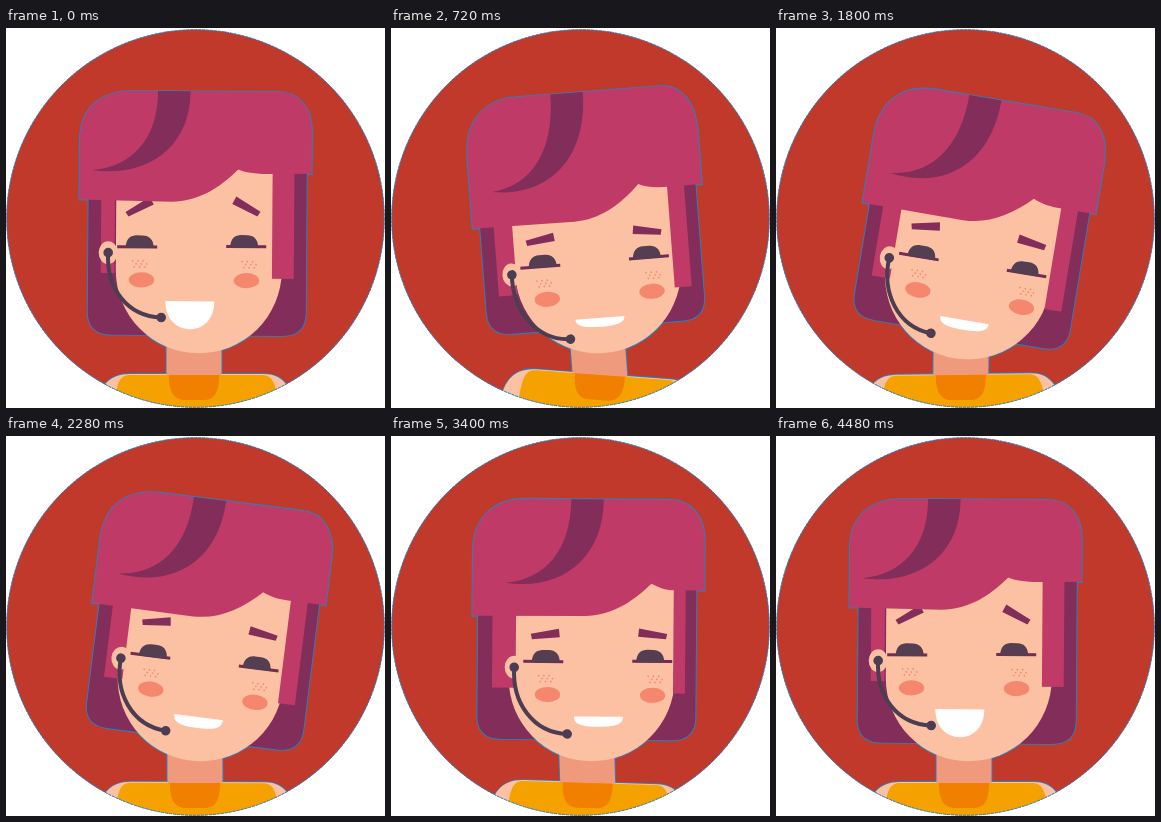
These frames come from a looping animation (379x380 px, 4.6 s). An HTML page:

```html
<!DOCTYPE html>
<html lang="en">
<head>
<meta charset="utf-8">
<title>Headset agent</title>
<style>
  html, body { margin: 0; width: 100%; height: 100%; overflow: hidden; background: #fff; }
  svg { display: block; width: 100%; height: 100%; }
</style>
</head>
<body>
<svg viewBox="0 0 379 380">
  <defs>
    <clipPath id="disc"><circle cx="189.5" cy="190.5" r="189"/></clipPath>
    <path id="back"/>
    <path id="hair"/>
    <path id="face" d="M-83-110V0A83 83 0 0 0 83 0V-110Z"/>
    <path id="neck" d="M-27.5-60H27.5V2H-27.5Z"/>
    <path id="shoulders" d="M-98 40C-97 14-87-1-64-1H70C90-1 99 14 103 40Z"/>
    <path id="lid" d="M-14-32C-14-41-9-44.500-3-44.500H3C9-44.500 14-41 14-32Z"/>
    <path id="brow" d="M-14.500-2.500L14-4.500V4L-14 3Z"/>
  </defs>
  <circle cx="189.5" cy="190.5" r="189" fill="#c1392b"/>
  <g clip-path="url(#disc)">
    <g fill="none" stroke="#1f86c8" stroke-width="1.8">
      <g class="head"><use href="#back"/><use href="#hair"/><use href="#face"/></g>
      <g class="torso"><use href="#neck"/><use href="#shoulders"/></g>
    </g>
    <g class="head"><use href="#back" fill="#822d5a"/></g>
    <g class="torso">
      <use href="#shoulders" fill="#fbc1a2"/>
      <use href="#neck" fill="#f09a7d"/>
      <path d="M-80 40C-78 10-76 0-64 0H68C80 0 82 10 86 40Z" fill="#f5a200"/>
      <path d="M-25 0H25C25 10 24 25 10 25H-9C-24 25-25 10-25 0Z" fill="#f17f00"/>
    </g>
    <g class="head">
      <use href="#face" fill="#fbc1a2"/>
      <path id="locks" fill="#bf3a66"/>
      <ellipse cx="-86" cy="-27" rx="9.5" ry="11.5" fill="#fbc1a2"/>
      <g fill="#f5876e">
        <ellipse cx="-52.5" rx="12.7" ry="7.6"/>
        <ellipse cx="52.5" rx="12.7" ry="7.6"/>
        <g id="freckles"/>
      </g>
      <path d="M-77-34.5H-37V-31.5H-77ZM32-35.5H72V-32.5H32Z" fill="#742b55"/>
      <use href="#lid" x="-54.5" fill="#553d52"/>
      <use href="#lid" x="50" y="-1" fill="#553d52"/>
      <use href="#brow" id="browL" fill="#822d5a"/>
      <use href="#brow" id="browR" fill="#822d5a"/>
      <path id="mouth" fill="#fff"/>
      <path id="cable" fill="none" stroke="#4d3d52" stroke-width="4"/>
      <circle cx="-86" cy="-27" r="4.8" fill="#4d3d52"/>
      <circle id="mic" r="4.8" fill="#4d3d52"/>
      <use href="#hair" fill="#bf3a66"/>
      <path id="stripe" fill="#822d5a"/>
    </g>
  </g>
  <circle cx="189.5" cy="190.5" r="188.8" fill="none" stroke="#1f86c8" stroke-dasharray="3 1"/>
</svg>
<script>
const el = id => document.getElementById(id);
const set = (id, attrs) => {
  for (const name in attrs) el(id).setAttribute(name, attrs[name]);
};
const place = (className, transform) =>
  document.querySelectorAll('.' + className).forEach(g => g.setAttribute('transform', transform));

const LOOP = 4600, STEP = 40;

// lean: sway of the body, tilt: degrees, nod and turn: parallax in pixels.
const rest = { lean: 0, drop: 0, tilt: 0, nod: 0, turn: 0, brows: 0, smile: 0 };
const laughing = { at: 0, smile: 1, turn: -8, brows: 13, tilt: .4 };
const poses = [
  laughing,
  { at: 720, lean: 21, tilt: -4.4, nod: 15 },
  { at: 1360, lean: -2.5, tilt: 8.7, nod: 15, drop: 10 },
  { at: 2280, lean: 1, tilt: 7.2, nod: 7, brows: 8 },
  { at: 3000, lean: 9.5 },
  { at: 3800, lean: 6, tilt: 1.7, nod: 12.5, turn: 14, brows: 3 },
  { ...laughing, at: 4480 }
].map(pose => ({ ...rest, ...pose }));
const last = poses.length - 1;

// Cubic Hermite through the poses, at rest at both ends of the loop.
function poseAt(t) {
  let i = 0;
  while (i < last - 1 && t >= poses[i + 1].at) i++;
  const from = poses[i], to = poses[i + 1];
  const span = to.at - from.at, u = (t - from.at) / span;
  const slope = (k, key) => k === 0 || k === last ? 0
    : (poses[k + 1][key] - poses[k - 1][key]) / (poses[k + 1].at - poses[k - 1].at) * span;
  const pose = {};
  for (const key in rest) {
    const a = from[key], b = to[key], m = slope(i, key), n = slope(i + 1, key);
    pose[key] = a + u * (m + u * (3 * (b - a) - 2 * m - n + u * (2 * (a - b) + m + n)));
  }
  return pose;
}

el('freckles').innerHTML = [-54.5, 55].map(cx =>
  Array.from({ length: 9 }, (_, i) =>
    `<circle cx="${cx - 7 + i * 1.75}" cy="${-19 + i * 2 % 3 * 3}" r=".85"/>`).join('')
).join('');

function drawHair({ nod, turn }) {
  const width = 232, left = -5.5 - .8 * turn - width / 2;
  const top = -189 - nod, s = turn / 190;
  const bottom = u => -80 + .27 * nod - 27 * u;
  // Points by share of width and height, and points relative to the lower edge.
  const at = (u, v) => `${left + u * width} ${top + v * (bottom(u) - top)} `;
  const edge = (u, dy) => `${left + u * width} ${bottom(u) + dy} `;

  set('hair', { d: `M${edge(0, 0)}L${at(0, .45)}C${at(0, .16)}${at(.09, 0)}${at(.23, 0)}
    L${at(.85, 0)}C${at(.94, 0)}${at(1, .18)}${at(1, .48)}L${edge(1, 0)}L${edge(.86, -3.8)}
    C${edge(.8 + s / 2, -5)}${edge(.76 + s, -8)}${edge(.726 + s, -12.5)}
    C${edge(.64 + s, 5)}${edge(.55 + s, 15)}${edge(.44 + s, 12.5)}Z` });

  const mid = .448 + s;
  set('stripe', { d: `M${at(mid - .07, 0)}C${at(mid - .07, .48)}${at(mid - .18, .74)}${at(.095 + s, .74)}
    C${at(mid - .11, .86)}${at(mid + .07, .58)}${at(mid + .07, 0)}Z` });

  const x0 = -114 - turn, x1 = 104 - turn, y = 55 - 1.55 * nod;
  set('back', { d: `M${x0}-95V${y - 23}Q${x0} ${y} ${x0 + 24} ${y}H${x1 - 24}Q${x1} ${y} ${x1} ${y - 23}V-110Z` });
  const innerL = -82 - .3 * turn, innerR = 75.5 - .3 * turn;
  set('locks', { d: `M${-100.5 - .9 * turn}-95H${innerL}V-6.5H${-100.5 - .9 * turn}Z
    M${innerR}-118H${92.5 - .9 * turn}V-2H${innerR}Z` });
}

function drawFeatures({ nod, brows, smile }) {
  const browY = -59.5 - brows, angle = 8 + 20 * smile;
  set('browL', { transform: `translate(-55 ${browY}) rotate(${-angle})` });
  set('browR', { transform: `translate(52 ${browY - 1}) rotate(${angle}) scale(-1 1)` });

  const depth = 13 - .27 * nod + 15 * smile, k = 19 - 6 * smile;
  set('mouth', { transform: `translate(${-1.5 - 2.5 * smile} ${21 + .1 * nod})`,
    d: `M-24.5 0H24.5C24.5 ${.65 * depth} ${k} ${depth} 0 ${depth}S-24.5 ${.65 * depth}-24.5 0Z` });

  const micY = 37.5 + .27 * nod;
  set('mic', { cx: -32.5, cy: micY });
  set('cable', { d: `M-86-27C-88 8-67 ${micY - 1}-32.5 ${micY}` });
}

function render(t) {
  const pose = poseAt(t);
  const { lean, drop, tilt, nod, turn } = pose;

  // The head swings around the round jaw; the features slide over it.
  const shiftX = 1.5 + .8 * turn + .4 * tilt, shiftY = 10 + nod;
  const jawX = 194 + .62 * lean + .15 * turn, jawY = 242.3 + drop;
  place('head', `translate(${jawX} ${jawY}) rotate(${tilt}) translate(${shiftX} ${shiftY})`);
  set('face', { transform: `translate(${-shiftX} ${-shiftY})` });

  place('torso', `translate(${188 + lean} 347) rotate(${.2 * lean})`);
  set('neck', { transform: `skewX(${.4 * lean})` });

  drawHair(pose);
  drawFeatures(pose);
}

const start = performance.now();
function tick() {
  const t = (performance.now() - start) % LOOP;
  render(Math.min(Math.floor(t / STEP) * STEP, poses[last].at));
  requestAnimationFrame(tick);
}
tick();
</script>
</body>
</html>
```
